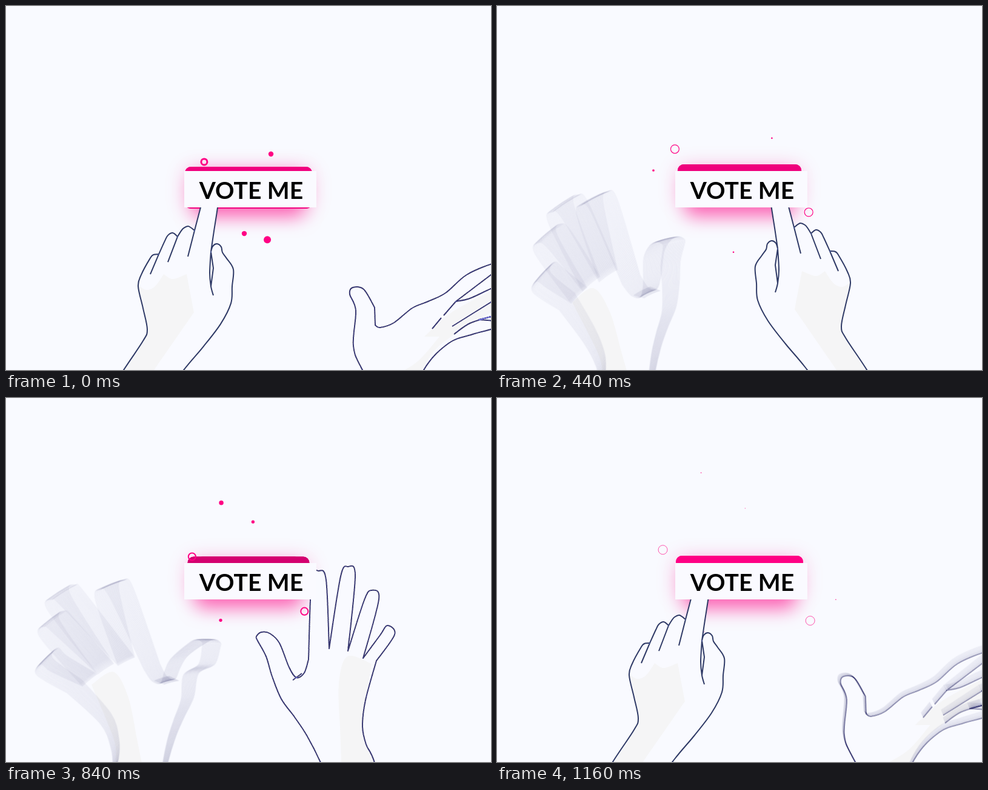
Recreate the animation shown at these times as an HTML page with a canvas. Size 800 px wide and 600 px high, loop 1200 ms.

```html
<!DOCTYPE html>
<html lang="en">
<head>
<meta charset="utf-8">
<title>Vote me</title>
<style>
  html, body { margin: 0; width: 100%; height: 100%; overflow: hidden; background: #f9faff; }
  canvas { display: block; }
</style>
</head>
<body>
<canvas id="stage" width="800" height="600"></canvas>
<script>
const PAPER = '#f9faff', INK = '#2f3a66', PINK = '#ff0084';
const LOOP = 1200, HALF = 600, REACH = 560, MIRROR = 801, SHUTTER = 40;
const ctx = document.getElementById('stage').getContext('2d');
const layer = document.createElement('canvas');
layer.width = 800;
layer.height = 600;
const ink = layer.getContext('2d');

const smoothstep = (from, to, v) => {
  const k = Math.min(1, Math.max(0, (v - from) / (to - from)));
  return k * k * (3 - 2 * k);
};

// Smooth curve through "x,y" points; "|" makes a corner, "/" starts a new stroke
function trace(text) {
  let d = '';
  for (const stroke of text.split('/')) {
    let last;
    for (const part of stroke.split('|')) {
      const pts = part.trim().split(/\s+/).map(pair => pair.split(',').map(Number));
      if (last) pts.unshift(last);
      else d += `M${pts[0]}`;
      last = pts[pts.length - 1];
      for (let i = 1; i < pts.length; i++) {
        const a = pts[i - 1], b = pts[i];
        const before = pts[i - 2] || a, after = pts[i + 1] || b;
        const c1 = a.map((v, j) => v + (b[j] - before[j]) / 6);
        const c2 = b.map((v, j) => v - (after[j] - a[j]) / 6);
        d += `C${c1} ${c2} ${b}`;
      }
    }
  }
  return new Path2D(d);
}

const shape = (body, lines, shade) => ({ body: trace(body), lines: trace(lines), shade: trace(shade) });

const press = {
  ...shape(
    '150,670 194,600 226,552 233,533 226,498 218,462 223,443 237,417 243,410 252,409' +
    '| 262,387 267,378 275,374 283,380 | 288,372 293,366 301,363 311,370 | 321,332' +
    '| 327,300 340,292 352,304 | 349,332 343,371 338,405' +
    '| 341,396 348,392 355,397 357,406 364,416 375,434 373,462 371,490 354,524 325,562 293,600 240,670',
    '252,409 238,442 / 283,380 267,422 / 311,370 300,413' +
    '/ 338,405 336,440 338,462 342,477 / 338,405 | 342,432 | 338,462',
    '220,462 232,468 246,462 260,442 | 275,450 298,442 | 310,505 | 240,606 | 192,606 | 232,541 226,498 218,462'),
  pivot: [0, 0], flip: 1
};

function openHand(spread) {
  const webs = [[190, 432], [212, 428], [237, 416], [268, 412], [302, 430]]
    .map(([x, y], i) => [x - 5 * spread * (4 - i), y]);
  const fingers = [[172, 374, 30], [198, 316, 33], [237, 277, 47], [285, 284, 15]]
    .map(([tip, y, fan], i) => {
      const x = tip - fan * spread;
      return `| ${x - 12},${y + 15} ${x},${y} ${x + 12},${y + 16} ${webs[i + 1]}`;
    });
  const thumb = [[366, 387], [380, 385], [388, 392], [386, 399], [372, 425]]
    .map(([x, y]) => `${x + 19 * spread},${y + 23 * spread}`);
  return {
    ...shape(
      `165,700 193,600 207,570 213,540 208,497 ${webs[0]} ${fingers.join(' ')}` +
      `| 309,452 322,460 334,443 350,${403 + 23 * spread} ${thumb.join(' ')}` +
      ' 362,458 347,495 325,525 305,555 282,600 240,700',
      '313,453 328,464',
      '198,437 238,425 252,470 250,540 | 247,620 | 188,620 | 193,600 207,570 213,540 208,497 198,437'),
    pivot: [322, 460], flip: 1, tilt: s => -32 * (1 - s)
  };
}
const open = openHand(0), wide = openHand(1);

const side = {
  ...shape(
    '640,690 588,600 573,560 577,502 567,475 572,464 590,467 608,497 | 609,526' +
    '| 617,530 640,522 670,498 696,487 725,473 760,443 805,424 822,426 800,443 | 742,487' +
    '| 765,482 800,466 838,452 838,468 800,488 | 828,488 838,496 800,512 | 780,517' +
    '| 808,520 808,530 770,541 730,556 689,600 650,690',
    '800,488 736,528 / 800,512 765,523 739,541 / 742,487 722,510 / 718,514 703,532',
    '690,545 735,505 800,470 | 800,505 | 740,541 705,570 680,610 | 640,610 | 680,585 715,545'),
  pivot: [609, 527], flip: -1, tilt: s => 50 * s
};

// How far a hand has swung from the stage edge (0) to the button (1)
const enter = p => smoothstep(70, 380, p);
const leave = p => 1 - smoothstep(290, 570, p);

// Sparks fly straight away from the button; each kind has a radius (0 = ring) and a speed
const kinds = [[0, .09], [0, .11], [4.2, .07], [4.2, .07], [6, .165], [6, .165]];
const starts = [
  [[327, 257], [468, 325], [437, 244], [393, 375], [431, 385], [329, 287]],
  [[474, 340], [332, 270], [406, 221], [363, 352], [369, 210], [469, 310]]
];

function buttonCentre(t) {
  const clock = (t + 28) % LOOP;
  const x = clock < REACH ? clock : clock - REACH;
  return 294.5 + 16 * Math.sin(Math.PI * Math.min(1, x / 280));
}

function drawButton(p, centre) {
  const k = Math.min(1, p / REACH);
  const size = 1 - .045 * Math.sin(Math.PI * k);
  const dark = Math.sin(Math.PI * k ** .4);
  const w = 210 * size, h = 69 * size;
  const box = inset => {
    ctx.beginPath();
    ctx.roundRect(400 - w / 2 + inset, centre - h / 2, w - 2 * inset, h, 10);
    ctx.fill();
  };
  const glow = (inset, alpha, blur, drop) => {
    ctx.shadowColor = `rgba(255,0,132,${alpha})`;
    ctx.shadowBlur = blur;
    ctx.shadowOffsetY = drop;
    box(inset);
  };
  ctx.save();
  ctx.fillStyle = `rgb(${255 - 55 * dark},0,${132 - 26 * dark})`;
  glow(0, .2, 34, 3);
  glow(14, .55, 30, 13 - 1.2 * (centre - 299.5));
  ctx.restore();
  ctx.fillStyle = `rgb(${255 - 55 * dark},0,${132 - 26 * dark})`;
  box(0);
}

function drawSparks(second, p) {
  ctx.fillStyle = ctx.strokeStyle = PINK;
  kinds.forEach(([r, speed], i) => {
    const [x, y] = starts[+second][i];
    const angle = Math.atan2(y - (second ? 293 : 303), x - 400);
    ctx.beginPath();
    ctx.arc(x + Math.cos(angle) * speed * p, y + Math.sin(angle) * speed * p,
      r ? r * (1 - p / 640) : 5 + p / 225, 0, 7);
    ctx.lineWidth = 3 * (1 - p / 720);
    if (r) ctx.fill();
    else ctx.stroke();
  });
}

function place(c, hand, s, dy, onRight) {
  c.setTransform(onRight ? -1 : 1, 0, 0, 1, onRight ? MIRROR : 0, dy);
  if (hand.tilt) {
    c.translate(192 + 130 * s, 527 - 66 * (1 - (1 - s) ** 3));
    c.rotate(hand.tilt(s) * Math.PI / 180);
  }
  c.scale(hand.flip, 1);
  c.translate(-hand.pivot[0], -hand.pivot[1]);
}

// Outlines are averaged over the shutter time to give motion blur
function drawHand(hand, swing, p, dy, onRight) {
  const n = hand.tilt ? 28 : 1;
  ink.resetTransform();
  ink.clearRect(0, 0, 800, 600);
  ink.globalCompositeOperation = 'lighter';
  ink.globalAlpha = 1 / n;
  ink.strokeStyle = INK;
  ink.lineWidth = 2;
  ink.lineJoin = 'round';
  ctx.fillStyle = PAPER;
  for (let i = 0; i < n; i++) {
    const s = swing(p + ((i + .5) / n - .5) * SHUTTER);
    place(ctx, hand, s, dy, onRight);
    ctx.fill(hand.body);
    place(ink, hand, s, dy, onRight);
    ink.stroke(hand.body);
    ink.stroke(hand.lines);
  }
  place(ctx, hand, swing(p), dy, onRight);
  ctx.fillStyle = '#f5f5f6';
  ctx.fill(hand.shade);
  ctx.resetTransform();
  ctx.drawImage(layer, 0, 0);
}

function frame(now) {
  const t = now % LOOP, p = t % HALF, second = t >= HALF;
  const centre = buttonCentre(t), push = centre - 299.5;

  ctx.fillStyle = PAPER;
  ctx.fillRect(0, 0, 800, 600);
  drawButton(p, centre);
  drawSparks(second, p);

  const leaving = p < 240 ? press : leave(p) > .4 ? open : side;
  const entering = p > 430 ? press : enter(p) < .4 ? side : p < 340 ? wide : open;
  const lift = hand => hand === press ? push : hand === side ? Math.min(0, push) : 0;
  drawHand(leaving, leave, p, lift(leaving), second);
  drawHand(entering, enter, p, lift(entering), !second);

  ctx.fillStyle = '#fafaff';
  ctx.fillRect(294, 272, 218, 60);
  ctx.fillStyle = '#000';
  ctx.font = 'bold 39px Lato, Arial, sans-serif';
  ctx.textAlign = 'center';
  ctx.fillText('VOTE ME', 404.5, 318);
  requestAnimationFrame(frame);
}
requestAnimationFrame(frame);
</script>
</body>
</html>
```
